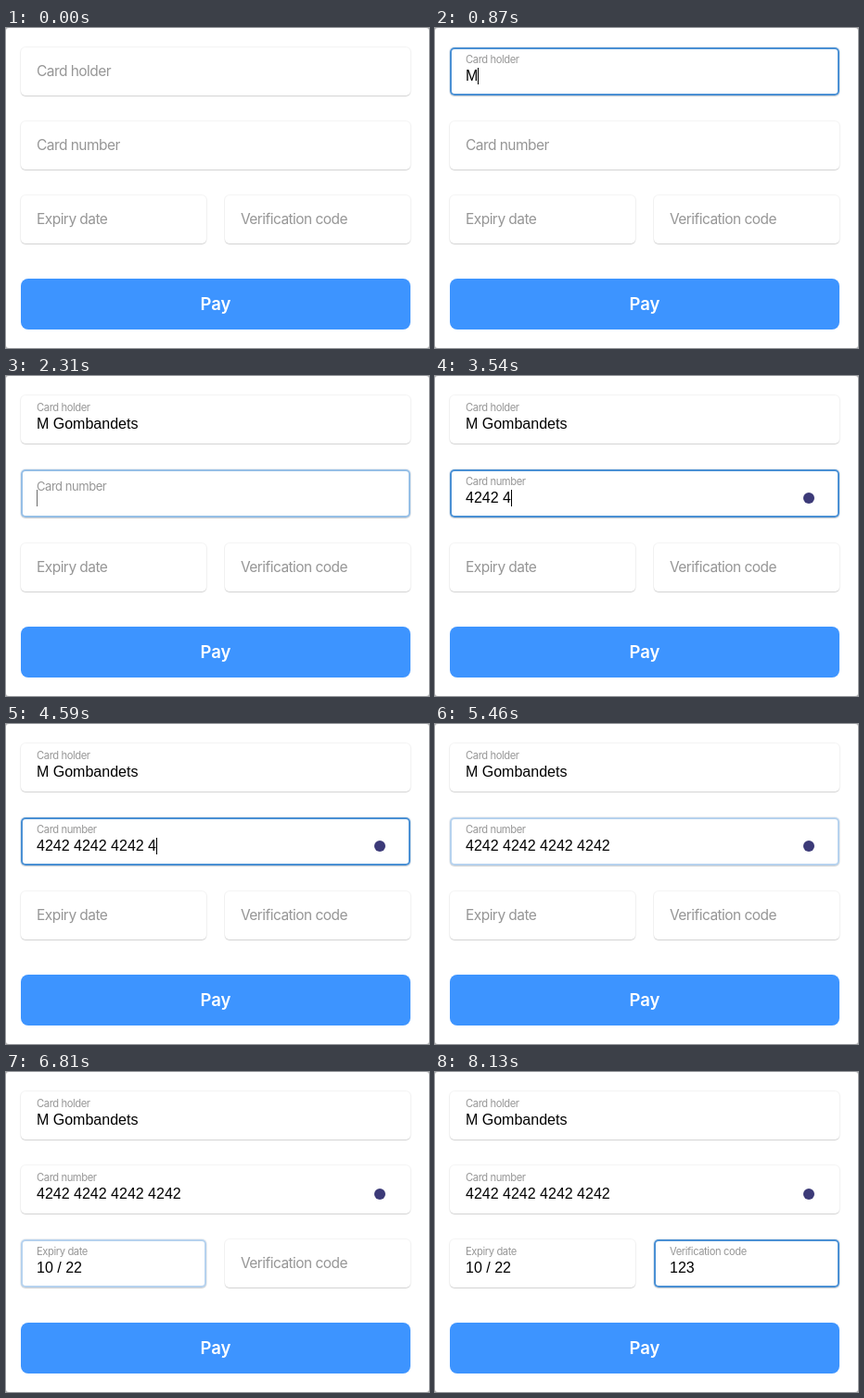
An HTML page that plays this animation: 456x346 px, repeating every 8.19 s.

```html
<!DOCTYPE html>
<html lang="en">
<head>
<meta charset="utf-8">
<title>Payment form</title>
<style>
html, body { margin: 0; width: 100%; height: 100%; overflow: hidden; background: #b4b4b4; }
#form {
  position: absolute; left: 0; top: 0; width: 456px; height: 346px;
  background: #fff; border-radius: 3px; overflow: hidden;
}
.field { position: absolute; height: 52px; border-radius: 5px; background: #fff; }
.label {
  position: absolute; left: 17px; top: 16px; line-height: 20px; white-space: pre;
  font: 15.5px/20px Inter, sans-serif; letter-spacing: -.035em; color: #969696;
  transform-origin: 0 50%;
}
.value {
  position: absolute; left: 17px; top: 22px; height: 18px; white-space: pre;
  font: 16px/18px "Liberation Sans", Arial, sans-serif; color: #000;
}
.caret { position: absolute; left: 100%; top: 0; width: 1px; height: 18px; background: #000; }
.brand {
  position: absolute; right: 27px; top: 25px; width: 12px; height: 12px;
  border-radius: 50%; background: #3c3a78;
}
#pay {
  position: absolute; left: 16px; top: 271px; width: 420px; height: 55px;
  border-radius: 8px; background: #3d94ff; color: #fff; text-align: center;
  font: 600 18.5px/55px Inter, sans-serif;
}
</style>
</head>
<body>
<div id="form"><div id="pay">Pay</div></div>
<script>
const LOOP = 8190, TICK = 30, CARET_ON = 450;
const clamp = x => Math.max(0, Math.min(1, x));
const run = (start, step, count) => Array.from({ length: count }, (_, i) => start + i * step);

// focus / blur: when the field gains and loses focus; keys: one time per typed character
const fields = [
  { label: 'Card holder', x: 16, y: 21, w: 420, focus: 10, blur: 2280,
    text: 'M Gombandets', keys: [870, ...run(1020, 96.6, 10), 2010] },
  { label: 'Card number', x: 16, y: 101, w: 420, focus: 2280, blur: 5460, brand: true,
    text: '4242424242424242', format: s => s.replace(/(.{4})(?=.)/g, '$1 '),
    keys: [...run(3060, 120, 5), 3630, ...run(3810, 120, 8), 5190, 5310] },
  { label: 'Expiry date', x: 16, y: 181, w: 200, focus: 5460, blur: 6810,
    text: '1022', format: s => s.replace(/^../, '$& / '),
    keys: [6060, 6180, 6420, 6540] },
  { label: 'Verification code', x: 236, y: 181, w: 200, focus: 6810, blur: Infinity,
    text: '123', keys: run(7440, 120, 3) },
];

function add(parent, className, text = '') {
  const el = document.createElement('div');
  el.className = className;
  el.textContent = text;
  return parent.appendChild(el);
}

for (const f of fields) {
  f.box = add(document.getElementById('form'), 'field');
  f.box.style.cssText = `left:${f.x}px;top:${f.y}px;width:${f.w}px`;
  f.title = add(f.box, 'label', f.label);
  f.value = add(f.box, 'value');
  f.typed = f.value.appendChild(document.createElement('span'));
  f.caret = add(f.value, 'caret');
  if (f.brand) f.logo = add(f.box, 'brand');
}

function drawField(f, t) {
  const lift = clamp((t - f.focus) / 52);
  const ring = t < f.blur ? lift : clamp(1 - (t - f.blur + 30) / 50);
  const count = f.keys.filter(k => k <= t).length;
  const text = f.text.slice(0, count);
  const lastInput = count ? f.keys[count - 1] : f.focus;
  const idle = t - lastInput;

  f.title.style.transform = `translateY(${-12.5 * lift}px) scale(${1 - 0.28 * lift})`;
  f.box.style.boxShadow =
    `inset 0 0 0 2px rgba(74,144,212,${ring}), 0 0 2px rgba(74,144,212,${0.3 * ring}),` +
    '0 0 0 1px rgba(0,0,0,.045), 0 1px 1px rgba(0,0,0,.14)';
  f.typed.textContent = f.format ? f.format(text) : text;
  f.caret.style.opacity = t < f.blur && idle < CARET_ON ? lift : 0;
  if (f.logo) f.logo.style.opacity = count ? 1 : 0;
}

function frame() {
  const t = Math.floor(performance.now() % LOOP / TICK) * TICK;
  fields.forEach(f => drawField(f, t));
  requestAnimationFrame(frame);
}
frame();
</script>
</body>
</html>
```
